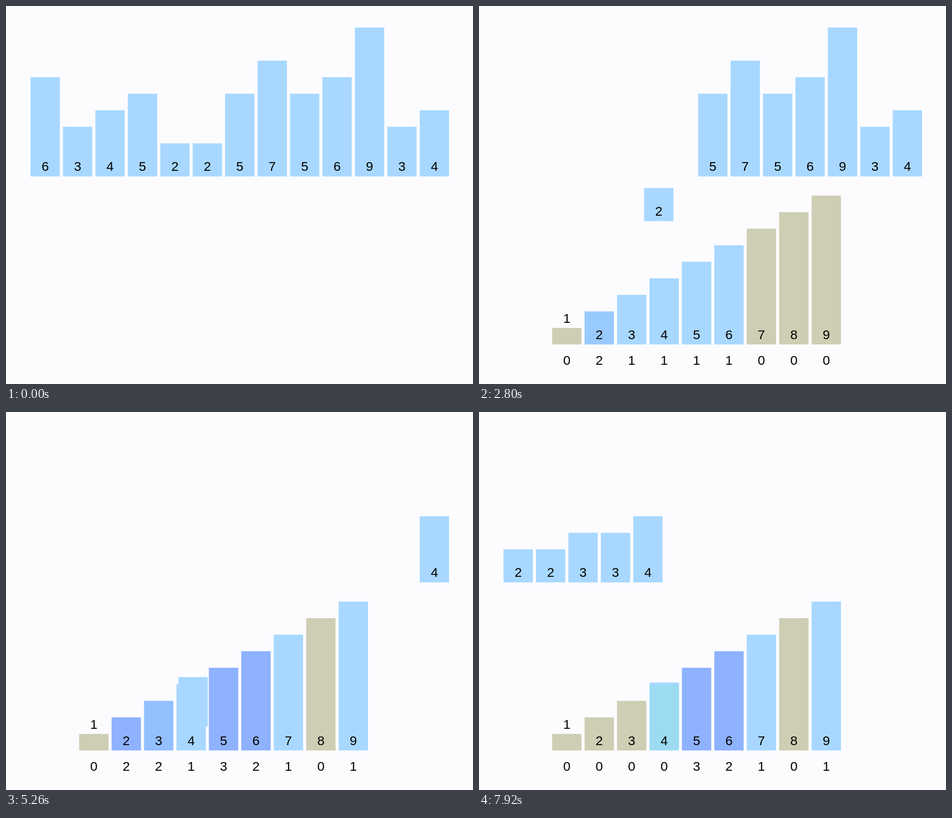
Write an HTML page with a canvas that moves like this. It is 800 by 649 pixels and loops after 8000 ms.

```html
<!DOCTYPE html>
<html lang="en">
<head>
<meta charset="utf-8">
<title>Counting sort</title>
<style>
  html, body { margin: 0; width: 100%; height: 100%; overflow: hidden; background: #fcfcff; }
  canvas { display: block; width: 800px; height: 649px; }
</style>
</head>
<body>
<canvas id="stage" width="800" height="649"></canvas>
<script>
const ctx = document.getElementById('stage').getContext('2d');

const LOOP = 8000, STEP = 400, MOVE = 250, START = 298.7;
const PITCH = 55.56, BAR_W = 50.3, UNIT = 28.4;
const TOP = { x: 42, y: 292.6 };
const BOTTOM = { x: 125.3, y: 581.1 };
const BACK = '#fcfcff', GREY = '#ceceb4', LIGHT = '#a8d8ff', DARK = '#8fb2ff';

const input = [6, 3, 4, 5, 2, 2, 5, 7, 5, 6, 9, 3, 4];
const output = [...input].sort((a, b) => a - b);

const lerp = (a, b, p) => a + (b - a) * p;
const clamp = v => Math.min(1, Math.max(0, v));
const ease = t => t < 0.5 ? 4 * t ** 3 : 1 - 4 * (1 - t) ** 3;
const countColor = n => n === 0 ? GREY : n === 1 ? LIGHT : DARK;

// Colours blend by hue, so grey passes through green on its way to blue
const mix = (a, b, p) =>
  a === b || p >= 1 ? b : `color-mix(in lch, ${a}, ${b} ${(p * 100).toFixed(1)}%)`;

// Share of the move done in the step that has the given index
const elapsed = (step, t) => clamp((t - START - step * STEP) / MOVE);
const progress = (step, t) => ease(elapsed(step, t));

// The picture advances 15 times a second, on a 20 ms grid
function snap(t) {
  const r = t % 200;
  const sub = r >= 120 ? 2 : r >= 60 ? 1 : 0;
  return (Math.floor(t / 200) * 3 + sub) * 200 / 3;
}

function label(text, x, y) {
  ctx.fillStyle = '#000';
  ctx.fillText(text, x + BAR_W / 2, y);
}

function bar(value, x, y, color, grow = 1) {
  const h = value * UNIT;
  ctx.fillStyle = color;
  ctx.fillRect(x, y - h, BAR_W * grow, h * grow);
  label(value, x, value === 1 ? y - h - 9 : y - 9.4);
}

// Bar between its slot in the row (p = 0) and its bucket (p = 1)
function movingBar(value, slot, p) {
  const x = lerp(TOP.x + slot * PITCH, BOTTOM.x + (value - 1) * PITCH, p);
  bar(value, x, lerp(TOP.y, BOTTOM.y, p), LIGHT);
}

function countAfter(value, step) {
  const taken = input.slice(0, Math.max(0, step)).filter(v => v === value).length;
  const given = output.slice(0, Math.max(0, step - input.length)).filter(v => v === value).length;
  return taken - given;
}

function draw(t) {
  const n = input.length;
  const step = Math.floor((t - START) / STEP);
  ctx.fillStyle = BACK;
  ctx.fillRect(0, 0, 800, 649);
  ctx.font = '22.4px "Liberation Sans", Arial, sans-serif';
  ctx.textAlign = 'center';

  input.forEach((v, i) => {
    const p = progress(i + 1, t);
    if (p < 1) movingBar(v, i, p);
  });
  output.forEach((v, i) => {
    const p = progress(n + 1 + i, t);
    if (p > 0) movingBar(v, i, 1 - p);
  });

  if (step < 0) return;
  const grow = progress(0, t), blend = elapsed(step, t);
  for (let v = 1; v <= 9; v++) {
    const x = BOTTOM.x + (v - 1) * PITCH;
    const count = countAfter(v, step);
    const color = mix(countColor(countAfter(v, step - 1)), countColor(count), blend);
    bar(v, x, BOTTOM.y, color, grow);
    label(count, x, 616.3);
  }
}

const begin = performance.now();
function tick() {
  draw(snap((performance.now() - begin) % LOOP));
  requestAnimationFrame(tick);
}
tick();
</script>
</body>
</html>
```
